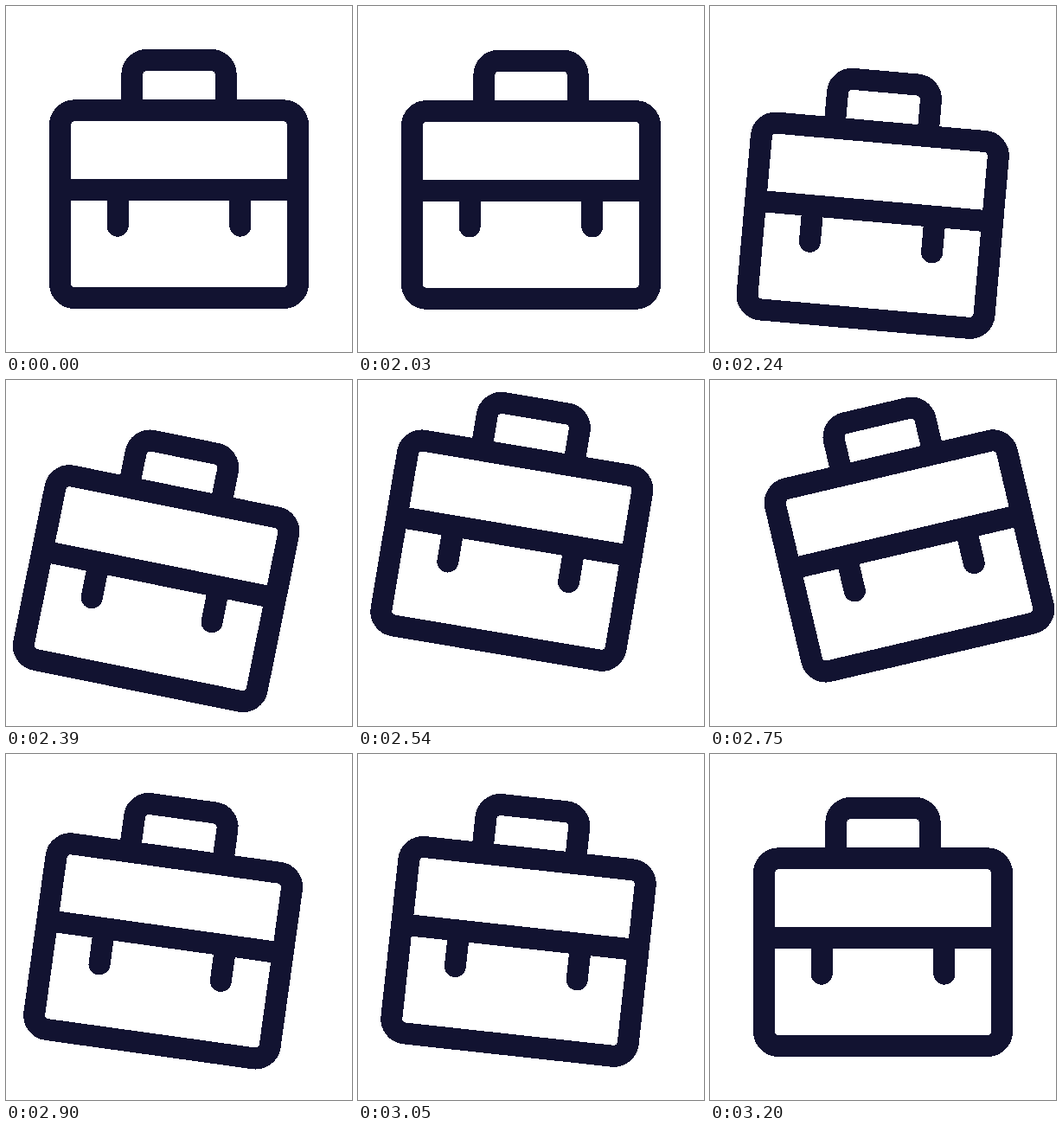
Write an HTML page that moves like this. It is 400 by 400 pixels and loops after 3.23 s.

```html
<!DOCTYPE html>
<html lang="en">
<head>
<meta charset="utf-8">
<title>Swinging briefcase</title>
<style>
  html, body { margin: 0; width: 100%; height: 100%; overflow: hidden; background: #fff; }
  svg { display: block; width: 100%; height: 100%; }
</style>
</head>
<body>
<svg viewBox="0 0 96 96" shape-rendering="crispEdges">
  <g id="case" fill="none" stroke="#121331" stroke-width="6">
    <rect x="15" y="29" width="66" height="52" rx="4"/>
    <path d="M35 29V19a4 4 0 0 1 4-4h18a4 4 0 0 1 4 4V29"/>
    <path d="M15 51H81"/>
    <path d="M31 52V61M65 52V61" stroke-linecap="round"/>
  </g>
</svg>
<script>
const LOOP = 3230, REST = 2030, STEP = 30;
const UNIT = 400 / 96; // stage pixels per drawing unit
const PIVOT = { x: 48, y: 23 };

// Keys: [step, value], eased in and out between neighbours
const LIFT = [[0, 0], [10, 28], [20.6, -40.5], [30, 0]];
const TILT = [[2, 0], [16.1, 13.05], [24.5, -13.6], [31.3, 10.2], [40, 0]];

const briefcase = document.getElementById('case');

function ease(u) {
  return u * u * (3 - 2 * u);
}

function valueAt(keys, n) {
  if (n <= keys[0][0]) return keys[0][1];
  for (let i = 1; i < keys.length; i++) {
    const [n0, v0] = keys[i - 1];
    const [n1, v1] = keys[i];
    if (n < n1) return v0 + (v1 - v0) * ease((n - n0) / (n1 - n0));
  }
  return keys[keys.length - 1][1];
}

function draw(ms) {
  const t = ms % LOOP;
  const n = t < REST ? 0 : Math.floor((t - REST) / STEP) + 1;
  const lift = valueAt(LIFT, n) / UNIT;
  const tilt = valueAt(TILT, n);
  briefcase.setAttribute('transform',
    `translate(0 ${lift.toFixed(4)}) rotate(${tilt.toFixed(3)} ${PIVOT.x} ${PIVOT.y})`);
}

let start;
function tick(now) {
  if (start === undefined) start = now;
  draw(Math.max(0, now - start));
  requestAnimationFrame(tick);
}
draw(0);
requestAnimationFrame(tick);
</script>
</body>
</html>
```
